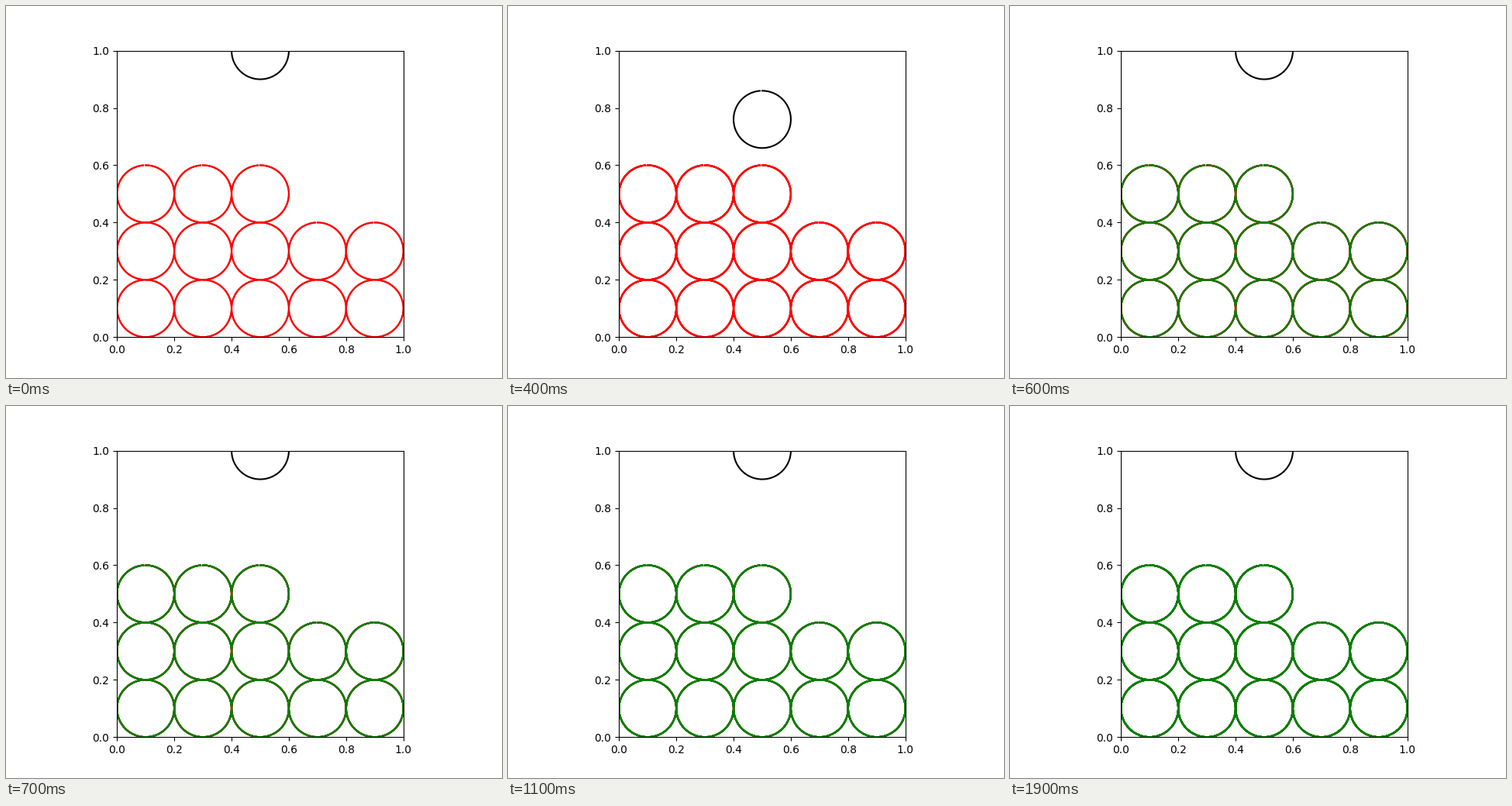
Animation of 640x480 px, one loop 2000 ms. Source, as a matplotlib script:

```python
import numpy as np
import matplotlib.pyplot as plt
from matplotlib.animation import FuncAnimation

FRAMES = 20
INTERVAL = 100
RADIUS = 0.1
STEP = 0.06          # fall per frame
HIT = 5              # the ball touches the stack here
HEIGHTS = (3, 3, 3, 2, 2)

angle = np.arange(0, 2 * np.pi, 0.1)


def circle(cx, cy):
    return cx + RADIUS * np.sin(angle), cy + RADIUS * np.cos(angle)


fig, ax = plt.subplots(figsize=(6.4, 4.8), dpi=100)
ax.set_aspect("equal")
ax.set_xlim(0, 1)
ax.set_ylim(0, 1)

ball, = ax.plot(*circle(0.5, 1.0), color="black", lw=1.5)
centers = [(RADIUS * (2 * col + 1), RADIUS * (2 * row + 1))
           for col, height in enumerate(HEIGHTS) for row in range(height)]


def add_layer(color):
    return [ax.plot(*circle(x, y), color=color, lw=1.5)[0] for x, y in centers]


# The stack is painted again on every frame, so its edges build up;
# the first frame is painted twice.
layers = [add_layer("red" if i <= HIT else "green") for i in range(FRAMES + 1)]


def update(i):
    y = 1.0 - STEP * i if i <= HIT else 1.0
    ball.set_data(*circle(0.5, y))
    for k, layer in enumerate(layers):
        for line in layer:
            line.set_visible(k <= i + 1)
    return [ball]


anim = FuncAnimation(fig, update, frames=FRAMES, interval=INTERVAL,
                     init_func=lambda: update(0), repeat=True, repeat_delay=0)
plt.show()
```
